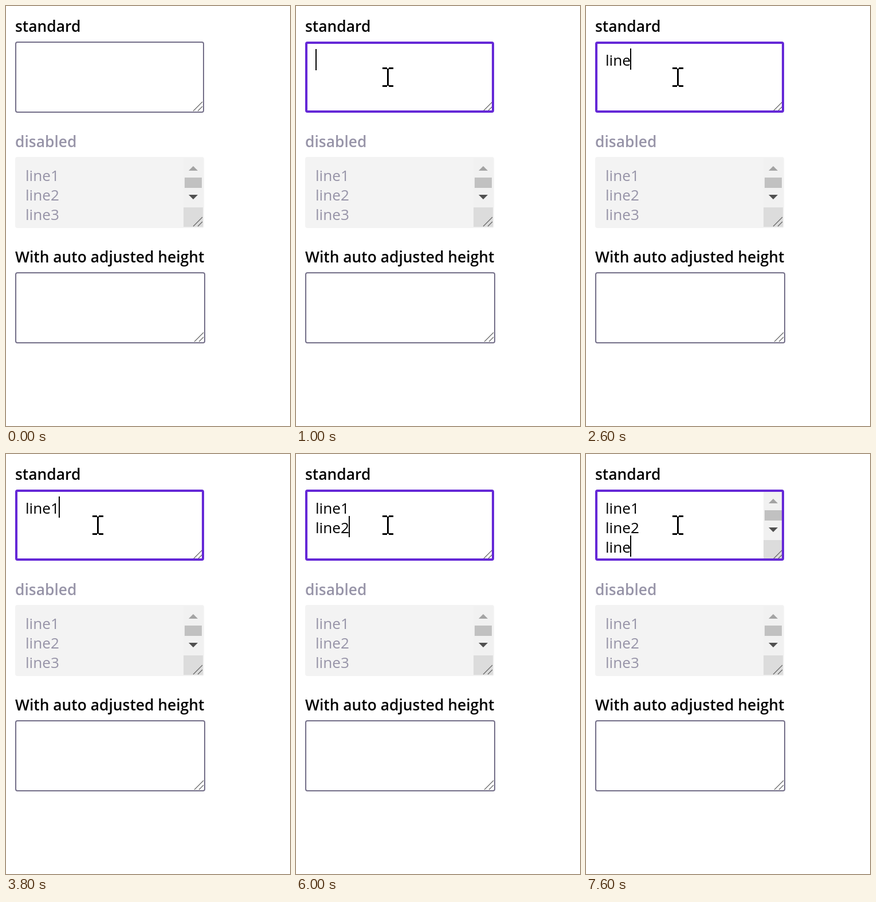
Write an HTML page that moves like this. It is 496x732 px and loops after 8000 ms.

```html
<!DOCTYPE html>
<html lang="en">
<head>
<meta charset="utf-8">
<title>Text areas</title>
<style>
html, body { margin: 0; height: 100%; overflow: hidden; background: #fff; }
svg { display: block; font: 26.2px "Open Sans", "Noto Sans", sans-serif; }
.label { font-weight: 600; font-size: 26.4px; }
.muted { fill: #9794a8; }
.frame { fill: none; stroke: #736e88; stroke-width: 2; }
</style>
</head>
<body>
<svg width="496" height="732" viewBox="0 0 496 732">
  <defs>
    <path id="grip" d="M327 183L343 167M335 183L343 175" stroke="#636363" stroke-width="1.1"/>
    <g id="scrollbar">
      <path fill="#f1f1f1" d="M310 64h34v86h-34z"/>
      <path fill="#c1c1c1" d="M312 98h30v18h-30z"/>
      <path fill="#a3a3a3" d="M319 86h16l-8-8z"/>
      <path fill="#505050" d="M319 128h16l-8 8z"/>
      <path fill="#dcdcdc" d="M310 150h34v34h-34z"/>
    </g>
  </defs>

  <text class="label" x="16" y="45">standard</text>
  <use id="bar" href="#scrollbar"/>
  <use href="#grip"/>
  <rect id="box" class="frame"/>
  <g id="lines">
    <text x="34" y="104"/>
    <text x="34" y="138"/>
    <text x="34" y="172"/>
  </g>
  <rect id="caret" width="2" height="37"/>

  <text class="label muted" x="16" y="246">disabled</text>
  <rect x="16" y="263" width="330" height="124" rx="4" fill="#f3f3f3"/>
  <use href="#scrollbar" y="201"/>
  <use href="#grip" y="201"/>
  <g class="muted">
    <text x="34" y="305">line1</text>
    <text x="34" y="339">line2</text>
    <text x="34" y="373">line3</text>
  </g>

  <text class="label" x="16" y="447">With auto adjusted height</text>
  <use href="#grip" x="2" y="402"/>
  <rect class="frame" x="17" y="465" width="330" height="122" rx="3"/>

  <path id="arrow" d="M338 226V257L345 250.5L350 261L354.5 259L350 249H360Z" fill="#fff" stroke="#000" stroke-width="2"/>
  <path id="beam" d="M0 0h8v3h-8zM11 0h8v3h-8zM8 2h3v30h-3zM0 31h8v3h-8zM11 31h8v3h-8z"/>
  <circle id="click" cx="158" cy="123" r="22" fill="#ff0" fill-opacity=".47"/>
</svg>
<script>
const LOOP = 8000;
const TEXT = "line1\nline2\nline";
const CARET_X = [34, 40, 47, 62, 77, 92];
// [time, characters typed, caret hidden]
const TYPING = [
  [1000, 0], [1600, 0, true], [2000, 1], [2200, 2], [2600, 4], [3200, 4, true],
  [3800, 5], [4000, 6], [4600, 6, true], [4800, 8], [5200, 9], [5400, 10],
  [5800, 10, true], [6000, 11], [6400, 12], [7000, 13], [7200, 14], [7600, 16]
];

const $ = id => document.getElementById(id);
const rows = $("lines").children;
const show = (id, on) => $(id).setAttribute("visibility", on ? "visible" : "hidden");
const set = (id, attrs) => {
  for (const name in attrs) $(id).setAttribute(name, attrs[name]);
};

function drawBox(t) {
  const focused = t >= 1000, hovered = t >= 600;
  const w = focused ? 4 : 2;
  set("box", { x: 16 + w / 2, y: 62 + w / 2, width: 330 - w, height: 124 - w, rx: 4 - w / 2 });
  $("box").style.strokeWidth = w;
  $("box").style.stroke = focused ? "#6528d7" : hovered ? "#000" : "";
  show("bar", t >= 6400);
}

function drawTyping(t) {
  const step = TYPING.findLast(s => s[0] <= t);
  const typed = TEXT.slice(0, step ? step[1] : 0).split("\n");
  for (let i = 0; i < rows.length; i++) rows[i].textContent = typed[i] || "";
  const row = typed.length - 1;
  const empty = typed.join("") === "";
  set("caret", { x: CARET_X[typed[row].length], y: 74 + 34 * row + (empty ? 1 : 0) });
  show("caret", step && !step[2]);
}

function drawPointer(t) {
  show("arrow", t >= 400 && t < 600);
  show("beam", t >= 600);
  set("beam", { transform: t < 800 ? "translate(173 114)" : "translate(151 107)" });
  show("click", t >= 1200 && t < 1400);
}

function draw() {
  const t = performance.now() % LOOP;
  drawBox(t);
  drawTyping(t);
  drawPointer(t);
  requestAnimationFrame(draw);
}
draw();
</script>
</body>
</html>
```
